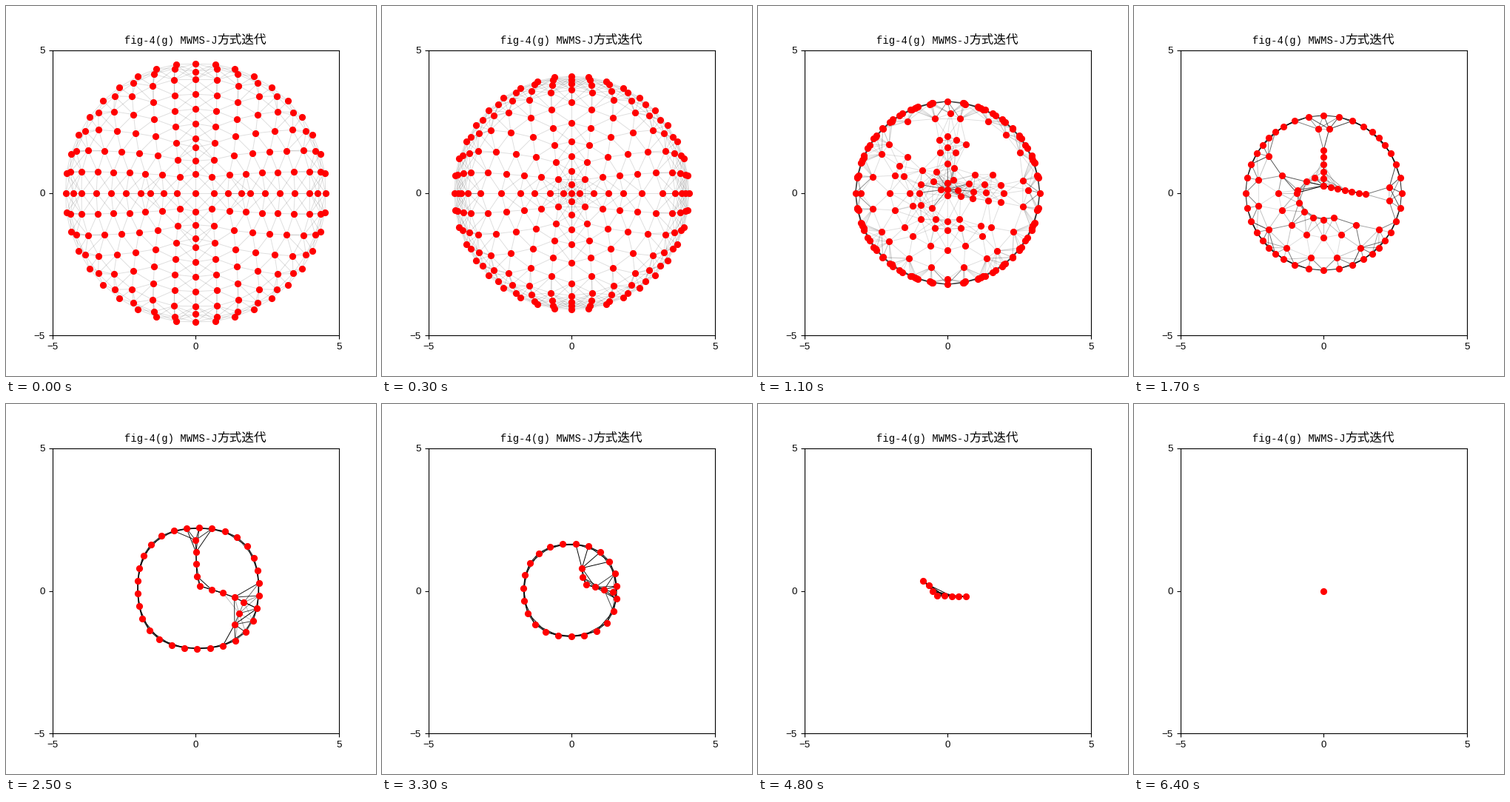
Animation of 500x500 px, one loop 6800 ms. Source, as a matplotlib script:

```python
import numpy as np
import matplotlib.pyplot as plt
from matplotlib.animation import FuncAnimation
from matplotlib.collections import LineCollection

REACH = 1.0        # agents closer than this are linked
EDGE_ALPHA = 0.13  # darkness of a single link
LAST = 64          # step at which all agents have met


def polar(radius, degrees):
    a = np.radians(degrees)
    return np.column_stack([radius * np.cos(a), radius * np.sin(a)])


def arc(radius, first, step, n):
    return polar(radius, first + step * np.arange(n))


def loop(radius, n, bulge, center):
    """Slightly squared circle of n agents."""
    deg = 5 + 360 / n * np.arange(n)
    r = radius + bulge * (1 - np.cos(np.radians(4 * deg)))
    return polar(r, deg) + center


def chain(corners, n):
    """n agents evenly spaced along a polyline."""
    c = np.array(corners)
    s = np.r_[0, np.cumsum(np.hypot(*np.diff(c, axis=0).T))]
    at = np.linspace(0, s[-1], n)
    return np.column_stack([np.interp(at, s, c[:, 0]), np.interp(at, s, c[:, 1])])


def rings(axis, off, pull):
    """One centre agent, then 4k agents on ring k; those on the axes differ."""
    pts = [np.zeros((1, 2))]
    for k in range(1, 11):
        j = np.arange(4 * k)
        r = np.where(j % k == 0, axis(k), off(k))
        bend = pull / k * np.sin(2 * np.pi * j / k)
        pts.append(polar(r, 90 * j / k - bend))
    return np.vstack(pts)


def merge(pts, targets, shrink):
    """Send each group to its nearest meeting place, leaving no place empty."""
    groups, inv = np.unique(pts, axis=0, return_inverse=True)
    d = np.linalg.norm(groups[:, None] * shrink - targets[None], axis=2)
    goal = d.argmin(axis=1)
    for t in range(len(targets)):
        i = d[:, t].argmin()
        goal[i] = t
        d[i] = np.inf
    return targets[goal[inv.ravel()]]


# Even rings of spacing 0.5, drawn in at the rim and disturbed near the centre.
start = rings(
    lambda k: .5 * k + np.interp(k, [1, 3, 4, 8, 10], [.15, .09, -.09, -.02, -.47]),
    lambda k: .5 * k + np.interp(k, [2, 5, 8, 9, 10], [-.22, -.08, .04, -.08, -.44]),
    pull=6)

# The outer four rings have piled up into one rim.
packed = rings(
    lambda k: min(3.73, .42 * (k - 1) + .05 * (k - 1) ** 2),
    lambda k: min(3.47 + .026 * k, .57 + .5 * (k - 2) + .03 * (k - 2) ** 2),
    pull=14)

# Rim, what is left of the inner rings, and a chain where the hole opens.
even = 9 * np.arange(40)
opening = np.vstack([
    polar(2.72, even + 4 * np.sin(np.radians(4 * even))),
    arc(2.32, 146.25, 22.5, 9),
    arc(1.58, 157.5, 22.5, 8),
    arc(.94, 180, 22.5, 6),
    arc(2.25, 85, 10, 2),
    arc(2.30, -7, 12, 2),
    chain([(-.9, .1), (-.4, .6), (0, .25)], 4),
    chain([(0, 1.5), (0, .25), (1.47, -.05)], 12)])

hollow = np.vstack([
    loop(2.12, 30, .07, (.09, .09)),
    chain([(0, 1.78), (.05, .2), (1.03, -.1), (1.7, -.36), (1.36, -1.18)], 11)])

shrunk = np.vstack([
    loop(1.63, 23, .04, (-.05, .02)),
    chain([(.36, .8), (.4, .25), (1.45, -.05)], 6)])

strand = chain([(-.85, .35), (-.62, .18), (-.42, -.17), (.64, -.2)], 8)
short_strand = strand * [.72, .5]

times = [0, 6, 17, 25, 33, 48, 56]
poses = [start, packed]
for places, shrink in [(opening, .73), (hollow, .78), (shrunk, .78),
                       (strand, .6), (short_strand, .7)]:
    poses.append(merge(poses[-1], places, shrink))


def agents(step):
    if step >= LAST:
        return np.zeros_like(start)
    if step >= times[-1]:
        return poses[-1] * .55 ** max(0, step - 57)
    s = np.searchsorted(times, step, side="right") - 1
    u = (step - times[s]) / (times[s + 1] - times[s])
    if s < 2:
        u **= .85  # the wide disc contracts fastest at first
    return poses[s] + (poses[s + 1] - poses[s]) * u


fig = plt.figure(figsize=(5, 5), dpi=100, facecolor="white")
ax = fig.add_axes([.125, .11, .775, .77])
ax.set(xlim=(-5, 5), ylim=(-5, 5), xticks=[-5, 0, 5], yticks=[-5, 0, 5])
for label in ax.get_xticklabels() + ax.get_yticklabels():
    label.set(fontfamily="Liberation Sans", fontsize=9.5)
fig.text(160 / 500, 449 / 500, "fig-4(g) MWMS-J",
         family="Liberation Mono", fontsize=10)
fig.text(285 / 500, 449 / 500, "方式迭代",
         family="Noto Sans CJK JP", fontsize=12)

links = LineCollection([], linewidths=.7, zorder=1)
ax.add_collection(links)
dots, = ax.plot([], [], "o", color="red", markersize=5.6, zorder=2)


def draw(n):
    pts, size = np.unique(agents(min(n, LAST)).round(4), axis=0, return_counts=True)
    gap = np.linalg.norm(pts[:, None] - pts[None], axis=2)
    i, j = np.nonzero(np.triu(gap <= REACH, 1))
    rgba = np.zeros((len(i), 4))
    rgba[:, 3] = 1 - (1 - EDGE_ALPHA) ** (size[i] * size[j])
    links.set_segments(np.stack([pts[i], pts[j]], axis=1))
    links.set_color(rgba)
    dots.set_data(pts[:, 0], pts[:, 1])
    return links, dots


anim = FuncAnimation(fig, draw, frames=68, interval=100, repeat=True, repeat_delay=0)
plt.show()
```
